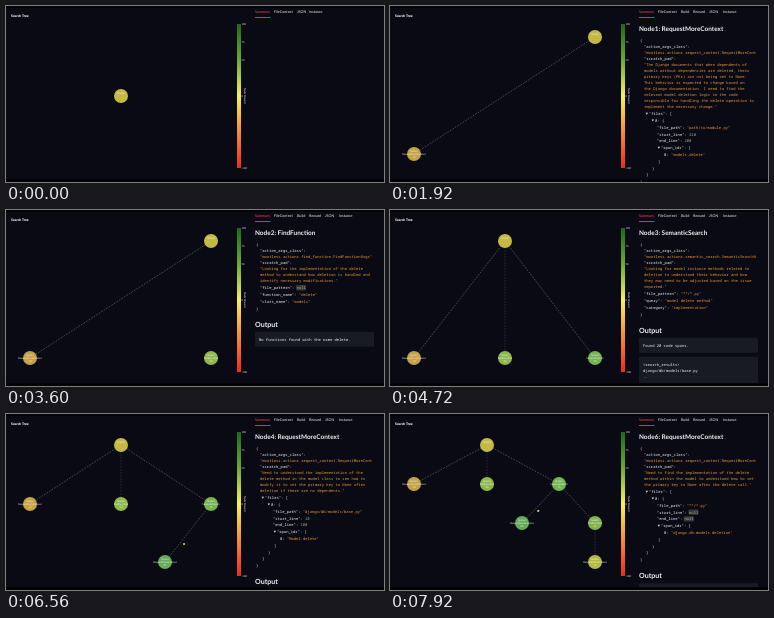
An HTML page for the animation above (8000 ms loop, 378 by 176 pixels).

```html
<!DOCTYPE html>
<html lang="en">
<head>
<meta charset="utf-8">
<title>Search tree</title>
<style>
html, body { margin: 0; width: 100%; height: 100%; overflow: hidden; background: #090a14; }
svg { display: block; width: 378px; height: 176px; text-rendering: geometricPrecision; }
text { fill: #f2f2f4; font: 3.7px Lato, sans-serif; }
.code { font: 3.82px "Noto Sans Mono", monospace; white-space: pre; }
.str { fill: #e8963c; }
.num { fill: #a9a68f; }
.title { font-weight: 700; font-size: 6.45px; }
.out { font-weight: 700; font-size: 7.1px; }
.head { font-weight: 900; font-size: 3.4px; }
.tick { font-size: 2.6px; }
.label { font-size: 2.5px; text-anchor: middle; }
.active { fill: #f4523f; }
.edge { stroke: #a2a2a6; stroke-width: .55; stroke-dasharray: 1.7 1.3; opacity: .75; }
.upright { opacity: .4; }
</style>
</head>
<body>
<svg id="stage" viewBox="0 0 378 176">
  <defs>
    <linearGradient id="scale" x2="0" y2="1">
      <stop offset="0" stop-color="#1d6a1c"/>
      <stop offset=".25" stop-color="#6fa832"/>
      <stop offset=".5" stop-color="#f6f35c"/>
      <stop offset=".72" stop-color="#f39a3c"/>
      <stop offset="1" stop-color="#f0281e"/>
    </linearGradient>
  </defs>
  <rect width="378" height="176" fill="#090a14"/>
  <rect width="378" height="1.5"/>
  <rect y="173.5" width="378" height="2.5"/>
  <text class="head" x="5" y="11">Search Tree</text>
  <rect x="231" y="18" width="4" height="144" fill="url(#scale)"/>
  <text class="tick" transform="translate(238.3 82) rotate(90)">Node Reward</text>
</svg>
<script>
const LOOP = 8000;
const CHAR = 3.82 * 0.6;
const stage = document.getElementById('stage');

const esc = s => String(s).replace(/&/g, '&amp;').replace(/</g, '&lt;');
const text = (x, y, s, cls = '') => `<text x="${x}" y="${y}" class="${cls}">${esc(s)}</text>`;
const code = (x, y, s, cls = '') => text(x, y + 1.3, s, 'code ' + cls);
const group = html => {
  const g = document.createElementNS('http://www.w3.org/2000/svg', 'g');
  g.innerHTML = html;
  stage.append(g);
  return g;
};

// Tree: layout, parent of each node, colour and action
const parents = [-1, 0, 0, 0, 3, 3, 5];
const colors = ['#c3b944', '#c5a244', '#8fb84a', '#76b352', '#62ad55', '#7fb54f', '#b3b944'];
const actions = ['', 'RequestMoreContext', 'FindFunction', 'SemanticSearch',
  'RequestMoreContext', 'FindFunction', 'RequestMoreContext'];
const rewards = ['0', '-25', '50', '75', '85', '60', '10'];

function tree(points, hidden = -1) {
  let edges = '', nodes = '';
  points.forEach(([x, y], i) => {
    const p = points[parents[i]];
    if (p && i !== hidden) {
      edges += `<line class="edge${p[0] === x ? ' upright' : ''}" x1="${p[0]}" y1="${p[1]}" x2="${x}" y2="${y}"/>`;
    }
    if (i === 4) {
      const dx = p[0] + (x - p[0]) * .69 + 4.8, dy = p[1] + (y - p[1]) * .69;
      edges += `<circle cx="${dx}" cy="${dy}" r="1.1" fill="#ced45c"/>`;
    }
    nodes += `<circle cx="${x}" cy="${y}" r="7" fill="${colors[i]}"/>` +
      text(x, y - 1.8, 'Node' + i, 'label') +
      text(x, y + 1, actions[i], 'label') +
      (i ? text(x, y + 3.8, rewards[i], 'label') : '');
  });
  return edges + nodes;
}

function tabs(list) {
  return list.map(([x, s], i) => text(x, 7.4, s, i ? '' : 'active')).join('') +
    '<rect x="249" y="11" width="15.5" height=".8" fill="#f4523f"/>';
}
const shortTabs = tabs([[249, 'Summary'], [268, 'FileContext'], [291, 'JSON'], [303, 'Instance']]);
const fullTabs = tabs([[249, 'Summary'], [268, 'FileContext'], [291, 'Build'],
  [303, 'Reward'], [319, 'JSON'], [333, 'Instance']]);

// One "key: value" row; null values get a badge
function row(x, y, key, value) {
  const name = /^\d/.test(key) ? key + ':' : `"${key}":`;
  const vx = x + (name.length + 1) * CHAR;
  let html = code(x, y, name);
  if (value === null) {
    html += `<rect x="${vx - .6}" y="${y - 2.8}" width="10" height="5.4" rx="1" fill="#363a35"/>` +
      code(vx, y, 'null', 'num');
  } else if (value === '[' || value === '{') {
    html += `<path d="M${x - 3.4} ${y - 1}h2.4l-1.2 2z" fill="#ddd"/>` + code(vx, y, value);
  } else if (typeof value === 'number') {
    html += code(vx, y, value, 'num');
  } else {
    html += code(vx, y, `"${value}"`, 'str');
  }
  return html;
}

const fileRows = (path, start, end, span) => [
  [259, 'files', '['], [265, '0', '{'],
  [267, 'file_path', path], [267, 'start_line', start], [267, 'end_line', end],
  [271, 'span_ids', '['], [274, '0', span],
  [268, ']'], [262, '}'], [256, ']'], [250, '}']
];

function pane(n, path, pad, rows, output = []) {
  let html = fullTabs + text(249, 25.3, `Node${n}: ${actions[n]}`, 'title') +
    code(250, 35, '{') + code(254, 41, '"action_args_class":') +
    code(254, 47, `"moatless.actions.${path}`.slice(0, 49), 'str') +
    code(254, 53, '"scratch_pad":');
  let y = 53;
  pad.forEach(line => html += code(254, y += 6, line, 'str'));
  rows.forEach(([x, key, value]) => {
    y += 6.8;
    html += value === undefined ? code(x, y, key) : row(x, y, key, value);
  });
  y += 16;
  html += text(249, y + 2.4, 'Output', 'out');
  y += 7.5;
  output.forEach(lines => {
    const h = 9 + lines.length * 6;
    html += `<rect x="249" y="${y}" width="119" height="${Math.max(0, Math.min(h, 173 - y))}" rx="1" fill="#181b24"/>`;
    lines.forEach((s, i) => html += code(253, y + 7.5 + i * 6, s));
    y += h + 4;
  });
  return html;
}

const two = [[205, 31], [24, 148]];
const wide = y => [[115, 31], [24, y], [115, y], [205, y]];
const deep = (a, b) => [[97, 31], [24, a], [97, a], [169, a], [132, b], [205, b]];

const steps = [
  [0, shortTabs + tree([[115, 90]])],
  [1280, tree(two) + pane(1, 'request_context.RequestMoreContextArgs"', [
    '"The Django documents that when dependents of',
    'models without dependencies are deleted, their',
    'primary keys (PKs) are not being set to None.',
    'This behavior is expected to change based on',
    'the Django documentation. I need to find the',
    'relevant model deletion logic in the code',
    'responsible for handling the delete operation to',
    'implement the necessary change."'
  ], fileRows('path/to/module.py', 320, 200, 'models.delete'))],
  [2560, tree([...two, [205, 148]], 2) + pane(2, 'find_function.FindFunctionArgs"', [
    '"Looking for the implementation of the delete',
    'method to understand how deletion is handled and',
    'identify necessary modifications."'
  ], [[254, 'file_pattern', null], [254, 'function_name', 'delete'],
    [254, 'class_name', 'models'], [250, '}']],
  [['No functions found with the name delete.']])],
  [4000, tree(wide(148)) + pane(3, 'semantic_search.SemanticSearchArgs"', [
    '"Looking for model instance methods related to',
    'deletion to understand their behavior and how',
    'they may need to be adjusted based on the issue',
    'reported."'
  ], [[254, 'file_pattern', '**/*.py'], [254, 'query', 'model delete method'],
    [254, 'category', 'implementation'], [250, '}']],
  [['Found 20 code spans.'], ['<search_results>', 'django/db/models/base.py', '..']])],
  [5280, tree([...wide(90), [159, 148]]) + pane(4, 'request_context.RequestMoreContextArgs"', [
    '"Need to understand the implementation of the',
    'delete method in the model class to see how to',
    'modify it to set the primary key to None after',
    'deletion if there are no dependents."'
  ], fileRows('django/db/models/base.py', 10, 100, 'Model.delete'))],
  [6640, tree(deep(90, 148)) + pane(5, 'find_function.FindFunctionArgs"', [
    '"Looking for the delete method of the model to',
    'understand how the primary key is handled after',
    'the deletion."'
  ], [[254, 'file_pattern', null], [254, 'function_name', 'delete'],
    [254, 'class_name', 'Model'], [250, '}']],
  [['No functions found with the name delete.']])],
  [7760, tree([...deep(70, 109), [205, 148]]) + pane(6, 'request_context.RequestMoreContextArgs"', [
    '"Need to find the implementation of the delete',
    'method within the model to understand how to set',
    'the primary key to None after the delete call."'
  ], fileRows('**/*.py', null, null, 'django.db.models.deletion'), [['']])]
].map(([at, html]) => ({ at, g: group(html) }));

group([[18, 100], [36, 75], [54, 50], [90, 0], [162, -100]]
  .map(([y, s]) => text(235.5, y + 1, s, 'tick')).join(''));

function draw(now) {
  const t = now % LOOP;
  const current = steps.filter(s => s.at <= t).pop();
  steps.forEach(s => s.g.style.display = s === current ? '' : 'none');
}
const origin = performance.now();
function loop() {
  draw(performance.now() - origin);
  requestAnimationFrame(loop);
}
loop();
</script>
</body>
</html>
```
